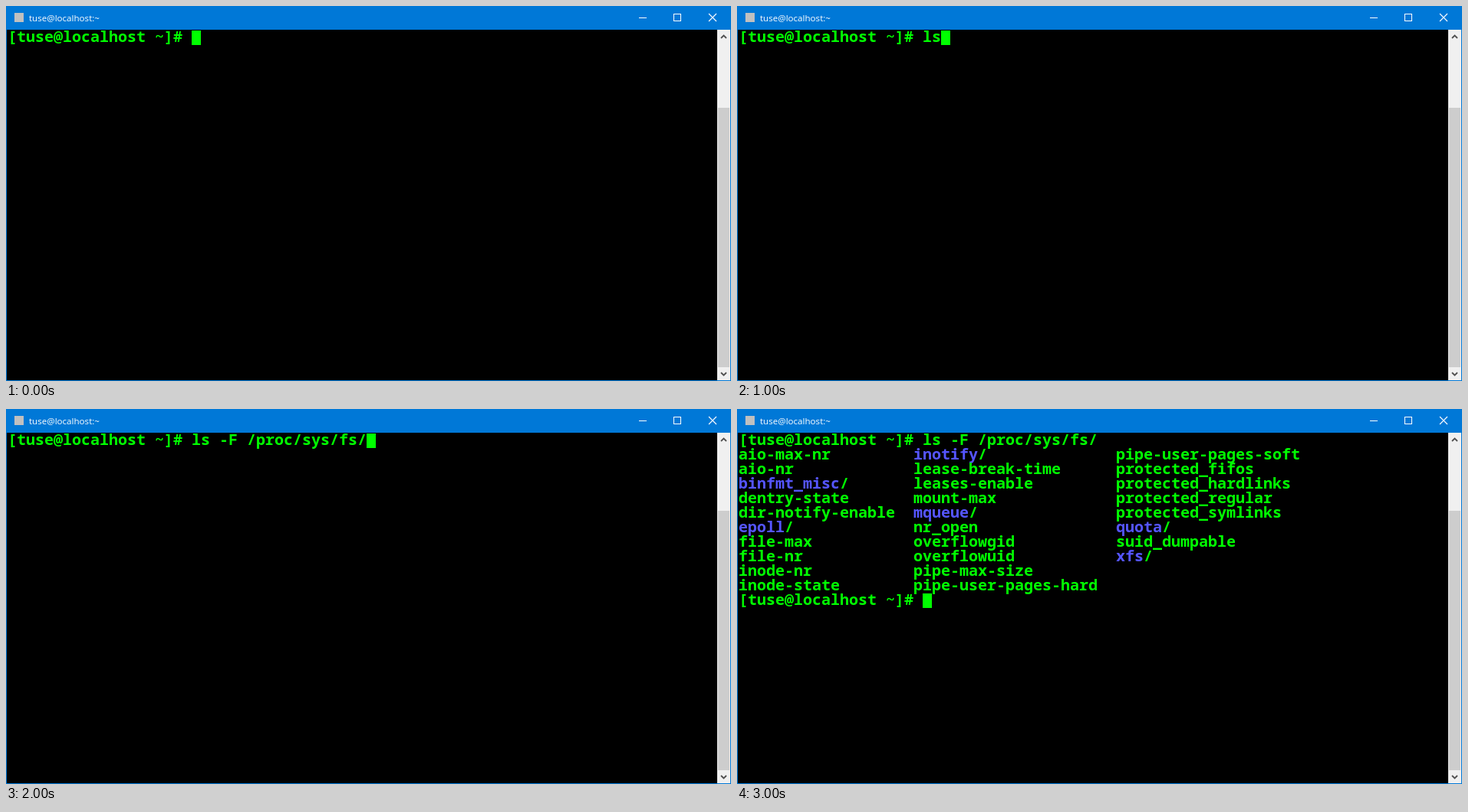
Recreate the animation shown at these times as an HTML page with a canvas. Size 945 by 490 pixels, loop 4000 ms.

```html
<!DOCTYPE html>
<html lang="en">
<head>
<meta charset="utf-8">
<title>Terminal</title>
<style>
  html, body { margin: 0; width: 100%; height: 100%; overflow: hidden; background: #000; }
  canvas { display: block; }
</style>
</head>
<body>
<canvas id="stage" width="945" height="490"></canvas>
<script>
const ctx = document.getElementById("stage").getContext("2d");
const LOOP = 4000, STEP = 1000;
const CELL = 12, LINE = 19, LEFT = 2, TOP = 32;
const GREEN = "#00ff00", BLUE = "#5555ff", ACCENT = "#0078d7";
const PROMPT = "[tuse@localhost ~]# ";
const INPUTS = ["", "ls", "ls -F /proc/sys/fs/"];

const LISTING = [
  [0, "aio-max-nr aio-nr binfmt_misc/ dentry-state dir-notify-enable epoll/ file-max file-nr inode-nr inode-state"],
  [19, "inotify/ lease-break-time leases-enable mount-max mqueue/ nr_open overflowgid overflowuid pipe-max-size pipe-user-pages-hard"],
  [41, "pipe-user-pages-soft protected_fifos protected_hardlinks protected_regular protected_symlinks quota/ suid_dumpable xfs/"]
];

function rect(x, y, w, h, color) {
  ctx.fillStyle = color;
  ctx.fillRect(x, y, w, h);
}

function line(color, width, ...points) {
  ctx.strokeStyle = color;
  ctx.lineWidth = width;
  ctx.beginPath();
  points.forEach(([x, y]) => ctx.lineTo(x, y));
  ctx.stroke();
}

function print(text, col, row, color = GREEN) {
  ctx.font = 'bold 20px "Noto Sans Mono", monospace';
  ctx.fillStyle = color;
  ctx.fillText(text, LEFT + col * CELL, TOP + row * LINE + 15);
}

function cursor(col, row) {
  rect(LEFT + col * CELL, TOP + row * LINE, CELL, LINE, GREEN);
}

function titleBar() {
  rect(0, 0, 945, 31, ACCENT);
  rect(11, 9, 12, 12, "#c0c0c0");
  ctx.font = '11.6px "Open Sans", sans-serif';
  ctx.fillStyle = "#fff";
  ctx.fillText("tuse@localhost:~", 30, 20);
  rect(825, 15, 10, 1, "#fff");
  ctx.strokeStyle = "#fff";
  ctx.lineWidth = 1;
  ctx.strokeRect(870.5, 10.5, 9, 9);
  line("#fff", 1.1, [916, 10], [926, 20]);
  line("#fff", 1.1, [926, 10], [916, 20]);
}

function scrollBar() {
  rect(927, 31, 17, 458, "#f0f0f0");
  rect(928, 133, 15, 339, "#cdcdcd");
  line("#505050", 1.8, [932, 42], [935.5, 38.5], [939, 42]);
  line("#505050", 1.8, [932, 479], [935.5, 482.5], [939, 479]);
}

function listing() {
  for (const [col, names] of LISTING) {
    names.split(" ").forEach((entry, i) => {
      const name = entry.replace("/", "");
      const isDir = name !== entry;
      print(name, col, i + 1, isDir ? BLUE : GREEN);
      if (isDir) print("/", col + name.length, i + 1);
    });
  }
}

function draw(now) {
  const step = Math.floor((now % LOOP) / STEP);
  const command = PROMPT + INPUTS[Math.min(step, 2)];
  rect(0, 0, 945, 490, ACCENT);
  rect(1, 31, 926, 458, "#000");
  titleBar();
  scrollBar();
  print(command, 0, 0);
  if (step < 3) {
    cursor(command.length, 0);
  } else {
    listing();
    print(PROMPT, 0, 11);
    cursor(PROMPT.length, 11);
  }
}

const start = performance.now();
function tick() {
  draw(performance.now() - start);
  requestAnimationFrame(tick);
}
tick();
</script>
</body>
</html>
```
